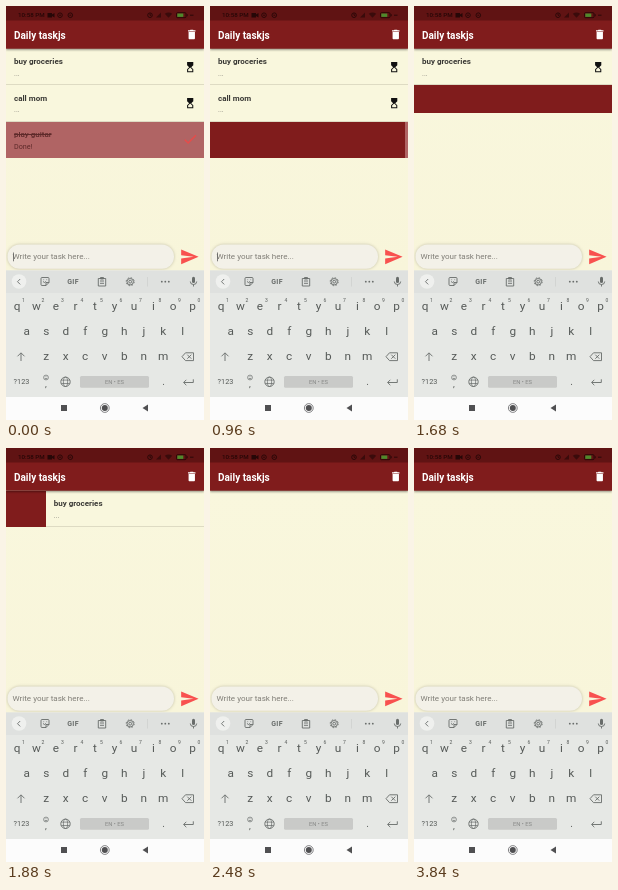
Recreate the animation shown at these times as an HTML page. Size 198 by 414 pixels, loop 3.92 s.

```html
<!DOCTYPE html>
<html lang="en">
<head>
<meta charset="utf-8">
<title>Daily tasks</title>
<style>
  html, body { margin: 0; width: 100%; height: 100%; overflow: hidden; }
  body { position: relative; background: #f8f6dc; font-family: Roboto, sans-serif; }
  .stage { position: absolute; left: 0; top: 0; width: 198px; height: 414px; overflow: hidden;
    background: linear-gradient(#f9f7dd 43px, #f8f5da 264px); }
  .list { position: absolute; top: 42.7px; width: 198px; }
  .row { height: 36.5px; overflow: hidden; background: #801c1c; }
  .card { position: relative; height: 36.5px; box-sizing: border-box; background: #f9f7dd;
    border-bottom: 1px solid #dedbc3; color: #3a3935; }
  .card b, .card span { position: absolute; left: 8px; white-space: pre; }
  .card b { top: 7.7px; font-size: 8px; line-height: 11px; }
  .card span { top: 20px; font-size: 7.2px; line-height: 10px; color: #85837a; }
  .card svg { position: absolute; left: 177.6px; top: 12.1px; width: 12.4px; height: 12.4px; }
  .done .card { background: #b06464; border-color: #b06464; color: #5e2a2a; }
  .done b { font-weight: 500; text-decoration: line-through .7px; }
  .done span { color: #5e2a2a; }
  .done .card svg { left: 175.800px; top: 9.800px; width: 16.4px; height: 16.4px; fill: #e84b49; }
  .view { position: absolute; left: 0; top: 0; }
  .bar { filter: drop-shadow(0 1px 1.2px rgba(0, 0, 0, .45)); }
  .pill { filter: drop-shadow(0 .6px 1.5px rgba(70, 65, 45, .3)); }

  .row, .card, .caret { animation: 3920ms linear infinite both; }
  .r1 { animation-name: fold1; } .r1 .card { animation-name: slide1; }
  .r2 { animation-name: fold2; } .r2 .card { animation-name: slide2; }
  .r3 { animation-name: fold3; } .r3 .card { animation-name: slide3; }
  .caret { animation-name: blink; animation-timing-function: step-end; }

  @keyframes slide3 {
    0%, 17.4% { transform: none; animation-timing-function: cubic-bezier(.37, 0, .63, 1); }
    25.1%, 100% { transform: translateX(198px); }
  }
  @keyframes fold3 {
    0%, 28.06% { height: 36.5px; animation-timing-function: ease; }
    32.65%, 100% { height: 0; }
  }
  @keyframes slide2 {
    0%, 29.15% { transform: none; animation-timing-function: cubic-bezier(.37, 0, .63, 1); }
    38.1%, 100% { transform: translateX(-198px); }
  }
  @keyframes fold2 {
    0%, 42.09% { height: 36.5px; animation-timing-function: ease; }
    46.68%, 100% { height: 0; }
  }
  @keyframes slide1 {
    0%, 45.41% { transform: none; animation-timing-function: cubic-bezier(.37, 0, .63, 1); }
    54.08%, 100% { transform: translateX(198px); }
  }
  @keyframes fold1 {
    0%, 57.65% { height: 36.5px; animation-timing-function: ease; }
    62.24%, 100% { height: 0; }
  }
  @keyframes blink {
    0%, 24.23%, 49.74%, 75.26% { opacity: 1; }
    11.48%, 36.99%, 62.5%, 88.01%, 100% { opacity: 0; }
  }
</style>
</head>
<body>
<div class="stage">
  <div class="list">
    <div class="row r1"><div class="card"><b>buy groceries</b><span>...</span>
      <svg viewBox="0 0 24 24"><use href="#glass"/></svg></div></div>
    <div class="row r2"><div class="card"><b>call mom</b><span>...</span>
      <svg viewBox="0 0 24 24"><use href="#glass"/></svg></div></div>
    <div class="row r3 done"><div class="card"><b>play guitar</b><span>Done!</span>
      <svg viewBox="0 0 24 24"><path d="M9 16.2L4.8 12l-1.4 1.4L9 19 21 7l-1.4-1.4z"/></svg></div></div>
  </div>

  <svg class="view" width="198" height="414" viewBox="0 0 198 414">
    <defs>
      <path id="glass" d="M6 2v6l4 4-4 4v6h12v-6l-4-4 4-4V2zM16 16.500V20H8v-3.500l4-4z" fill="#111"/>
    </defs>

    <!-- header -->
    <rect class="bar" width="198" height="42.700" fill="#801c1c"/>
    <rect width="198" height="14.500" fill="#601313"/>
    <g fill="#260707">
      <text x="12" y="11.300" font-size="6.200" font-weight="500">10:58 PM</text>
      <path d="M41.500 7h4.500v1.500l2.500-1.500v4.500l-2.500-1.500v1.500h-4.500z"/>
      <path d="M150 11.500l5-5v5zM158.800 7.800q3.700-2.600 7.400 0l-3.700 4z" opacity=".65"/>
    </g>
    <g fill="none" stroke="#260707" stroke-width=".9">
      <circle cx="54" cy="9.200" r="2.300"/><path d="M53 9.200h2"/>
      <circle cx="64.300" cy="9.200" r="2.300"/><path d="M63.300 9.200h2"/>
      <circle cx="144" cy="9.200" r="2.300"/><path d="M144 7.800v1.500h1.200"/>
      <rect x="170.500" y="6.700" width="9.500" height="5" rx="1"/><path d="M181.200 8.200v2M184 9.200h3.500"/>
    </g>
    <rect x="171.300" y="7.500" width="6" height="3.400" fill="#4f8a2c"/>
    <text x="8" y="32.600" font-size="10" font-weight="600" fill="#fff">Daily taskjs</text>
    <path transform="translate(179.400 22.200) scale(.53)" fill="#fff"
      d="M6 19c0 1.100.9 2 2 2h8c1.100 0 2-.9 2-2V7H6zM19 4h-3.500l-1-1h-5l-1 1H5v2h14z"/>

    <!-- input -->
    <rect class="pill" x="1.500" y="238.500" width="166.500" height="24.300" rx="12.100" fill="#f3f1e8"/>
    <text x="6.500" y="253.400" font-size="8.050" fill="#807e77">Write your task here...</text>
    <rect class="caret" x="7" y="246.500" width=".8" height="8.800" fill="#5f605e"/>
    <path transform="translate(173.500 240.900) scale(.83)" fill="#f8514f" d="M2 21l21-9L2 3v7l15 2-15 2z"/>

    <!-- keyboard -->
    <rect y="264.500" width="198" height="127" fill="#e6e8e5"/>
    <rect y="264.500" width="198" height="22.500" fill="#dfe1df"/>
    <rect y="391" width="198" height="23" fill="#fcfcfc"/>
    <circle cx="13" cy="275.500" r="7.300" fill="#eff0ee"/>
    <g fill="none" stroke="#686c6a" stroke-width=".9" stroke-linejoin="round">
      <path d="M14.200 273l-2.700 2.700 2.700 2.700"/>
      <path d="M35 272.500q0-1 1-1h6q1 0 1 1v4l-3 3h-4q-1 0-1-1zM43 276.500h-3v3M37 275.500q1.500 2 3 0M37.500 273.700h.6M40.500 273.700h.6"/>
      <path d="M92.300 272.500h7.400v7.500h-7.400zM94.500 271.500h3v1.500h-3zM94 275h4M94 277.300h4"/>
      <circle cx="124.200" cy="275.700" r="1.400"/>
      <circle cx="124.200" cy="275.700" r="3.200"/>
      <circle cx="124.200" cy="275.700" r="4" stroke-dasharray="1.570 1.570"/>
      <path d="M141.500 271v9.500" stroke="#cdcfcd" stroke-width=".7"/>
      <path d="M184.300 275.500q0 3 3.200 3t3.200-3M187.500 278.500v2"/>
      <!-- shift, backspace, enter, globe, emoji -->
      <path d="M15 355v-8M11.500 350.300l3.500-3.500 3.500 3.500"/>
      <path d="M179.500 346.800h8v7.800h-8l-3.500-3.900zM181.300 348.700l4 4M185.300 348.700l-4 4"/>
      <path d="M187.300 373.300v3.200h-9.500M180.300 373.800l-2.700 2.700 2.700 2.700"/>
      <circle cx="59.500" cy="375.800" r="4.700"/>
      <ellipse cx="59.500" cy="375.800" rx="2.100" ry="4.700" stroke-width=".7"/>
      <path d="M55.200 374.100h8.600M55.200 377.500h8.600" stroke-width=".7"/>
      <g stroke-width=".7"><circle cx="40" cy="371.500" r="2.400"/><path d="M38.800 372.200q1.200 1.200 2.400 0M39 370.700h.5M40.600 370.700h.5"/></g>
    </g>
    <g fill="#686c6a">
      <rect x="186" y="270.800" width="3" height="6.300" rx="1.500"/>
      <circle cx="155.800" cy="275.700" r=".9"/><circle cx="159.300" cy="275.700" r=".9"/><circle cx="162.800" cy="275.700" r=".9"/>
      <text x="67" y="278.200" font-size="7" font-weight="700" text-anchor="middle" letter-spacing=".3">GIF</text>
    </g>
    <rect x="74" y="370" width="69" height="11.800" rx="1.500" fill="#c9cac8"/>
    <text x="108.500" y="378.100" font-size="5.800" fill="#868886" text-anchor="middle">EN • ES</text>
    <g id="keys" fill="#565a58" text-anchor="middle">
      <text x="15.500" y="378.300" font-size="7.300">?123</text>
      <text x="40" y="380.500" font-size="9">,</text>
      <text x="157.500" y="379.300" font-size="10">.</text>
    </g>

    <!-- navigation -->
    <g fill="#505052">
      <rect x="55" y="399" width="6" height="6"/>
      <circle cx="98.800" cy="402" r="3"/>
      <circle cx="98.800" cy="402" r="4.400" fill="none" stroke="#505052" stroke-width=".7"/>
      <path d="M136.500 402l5.500-3.500v7z"/>
    </g>
  </svg>
</div>
<script>
  const keys = document.getElementById('keys');

  function label(text, x, y, size) {
    const el = document.createElementNS('http://www.w3.org/2000/svg', 'text');
    el.textContent = text;
    el.setAttribute('x', x);
    el.setAttribute('y', y);
    el.setAttribute('font-size', size);
    keys.append(el);
  }

  const pitch = 19.5;
  [['qwertyuiop', 11, 304], ['asdfghjkl', 20.8, 329], ['zxcvbnm', 40.2, 354.2]]
    .forEach(([row, x, y]) => [...row].forEach((c, i) => label(c, x + i * pitch, y, 11.8)));
  [...'1234567890'].forEach((c, i) => label(c, 17.3 + i * pitch, 296, 5));
</script>
</body>
</html>
```
